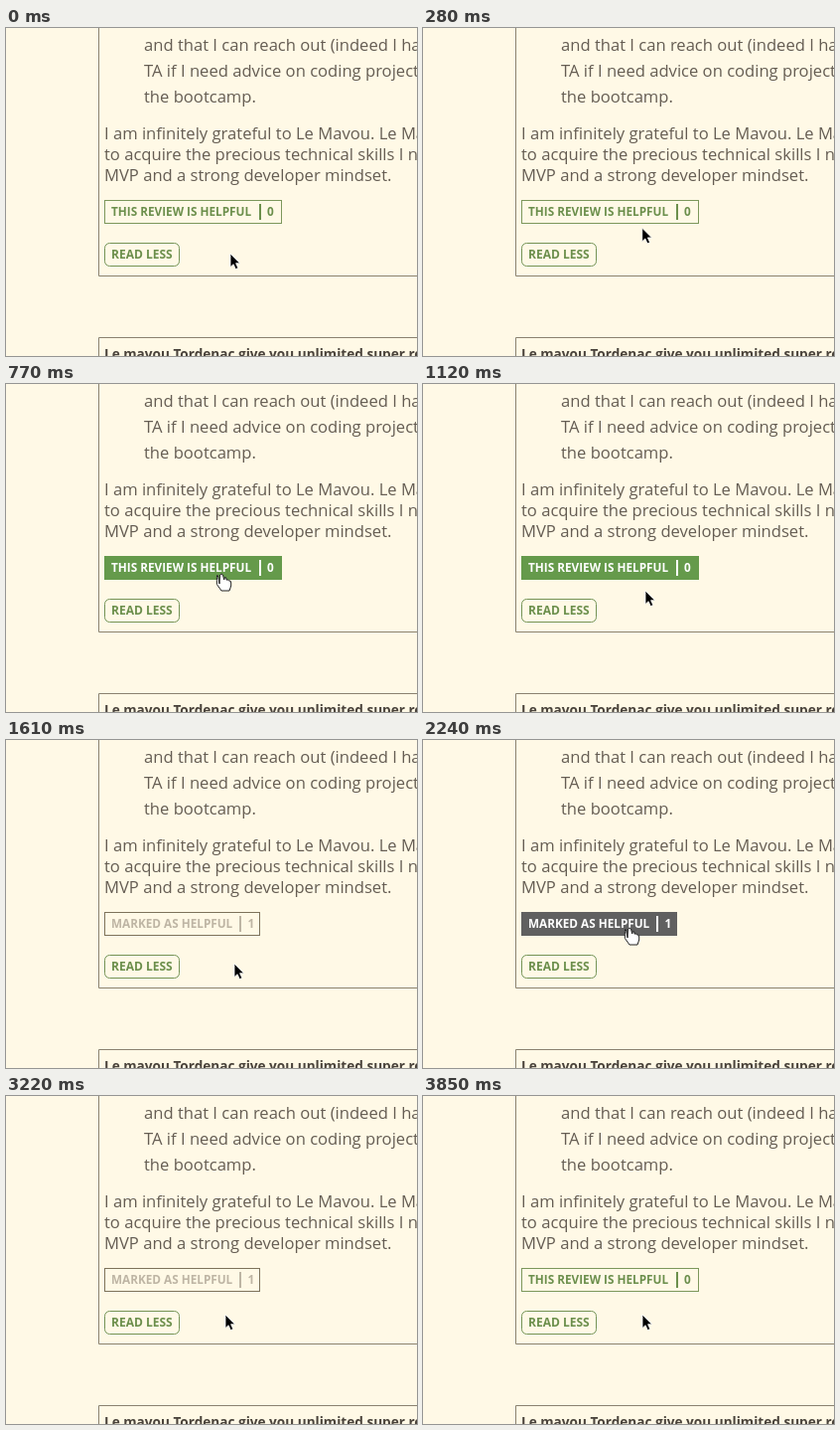
An HTML page for the animation above (3920 ms loop, 414 px wide and 330 px high).

```html
<!DOCTYPE html>
<html lang="en">
<head>
<meta charset="utf-8">
<title>Helpful review button</title>
<style>
  html, body { margin: 0; width: 100%; height: 100%; overflow: hidden; background: #fff9e6; }
  svg { display: block; width: 414px; height: 330px; }
  text { font-family: "Open Sans", sans-serif; white-space: pre; }
  .copy { font-size: 16.6px; fill: #655d53; }
  .title { font-size: 13.6px; font-weight: 700; fill: #4a433b; }
  .label { font-size: 11.75px; font-weight: 700; }
  .line { fill: none; stroke: #8b8270; }
</style>
</head>
<body>
<svg viewBox="0 0 414 330">
  <rect width="414" height="330" fill="#fff9e6"/>
  <path class="line" d="M93.5 0V249.5H414M93.5 330V311.5H414"/>
  <g class="copy">
    <text x="139" y="23">and that I can reach out (indeed I have)</text>
    <text x="139" y="49">TA if I need advice on coding projects</text>
    <text x="139" y="75">the bootcamp.</text>
    <text x="99" y="112">I am infinitely grateful to Le Mavou. Le Mavou</text>
    <text x="99" y="133">to acquire the precious technical skills I need</text>
    <text x="99" y="154">MVP and a strong developer mindset.</text>
  </g>
  <text class="title" x="99" y="332.5">Le mavou Tordenac give you unlimited super review</text>

  <rect id="box" x="99.5" y="173.5" height="23"/>
  <g id="ink" class="label">
    <text id="caption" x="106" y="189"></text>
    <rect id="bar" y="177" width="2" height="16"/>
    <text id="count" y="189"></text>
  </g>

  <rect x="99.5" y="216.5" width="75" height="23" rx="5" fill="none" stroke="#749356"/>
  <text class="label" x="106" y="232" style="font-size:12px" fill="#6c8f4c">READ LESS</text>

  <path id="arrow" d="M0 0V13.5L3.1 10.7L5.3 15.6L7.8 14.5L5.6 9.7H9.7Z"
        fill="#000" stroke="#fff" stroke-width=".8"/>
  <path id="hand" d="M-1.5 1Q0-1 1.5 1L2.7 6Q4-.0 5.2 6.2Q6.8 5 7.5 7Q9.6 6.2 9.7 9V12L8 17H0L-4.6 10.5Q-5-8 -2 10Z"
        fill="#fff" stroke="#222" stroke-linejoin="round"/>
</svg>
<script>
const LOOP = 3920, STEP = 70;
const CREAM = [255, 249, 230], WHITE = [255, 255, 255];
const $ = id => document.getElementById(id);

const unmarked = { caption: "THIS REVIEW IS HELPFUL", count: "0", width: 178, bar: 255, num: 263,
                   fill: [101, 154, 75], ink: [108, 143, 76], edge: [125, 151, 92] };
const marked = { caption: "MARKED AS HELPFUL", count: "1", width: 156, bar: 235, num: 243.5,
                 fill: [96, 96, 96], ink: [190, 181, 164], edge: [126, 115, 91] };

// time, x, y of the pointer tip
const route = [
  [0, 226, 227], [70, 226, 226], [350, 219, 193], [490, 217, 191], [560, 216, 190],
  [630, 216, 190], [770, 217, 191], [980, 217, 191], [1120, 224, 208], [1330, 231, 225],
  [1610, 230, 225], [1750, 228, 222], [2030, 212, 193], [2240, 208, 189], [2520, 208, 189],
  [2660, 209, 190], [2800, 209, 190], [2940, 214, 205], [3220, 221, 220], [3920, 221, 220]
];

const ramp = (t, a, b) => Math.min(1, Math.max(0, (t - a) / (b - a)));
const mix = (a, b, k) => a.map((v, i) => v + (b[i] - v) * k);
const rgb = c => `rgb(${c.map(Math.round)})`;

function pointer(t) {
  const i = route.findIndex(p => p[0] > t);
  const [a, b] = [route[i - 1], route[i]];
  return mix(a, b, ramp(t, a[0], b[0])).slice(1);
}

function draw(t) {
  const state = t >= 1540 && t < 3360 ? marked : unmarked;
  const fill = ramp(t, 280, 420) - ramp(t, 1120, 1400)
             + ramp(t, 2030, 2170) - ramp(t, 2800, 3010);
  const fresh = t >= 3360 ? 0.4 + 0.6 * ramp(t, 3500, 3850) : 1;
  const ink = mix(mix(CREAM, state.ink, fresh), WHITE, fill);

  $("box").setAttribute("width", state.width);
  $("box").setAttribute("fill", rgb(mix(CREAM, state.fill, fill)));
  $("box").setAttribute("stroke", rgb(mix(state.edge, state.fill, fill)));
  $("ink").setAttribute("fill", rgb(ink));
  $("caption").textContent = state.caption;
  $("bar").setAttribute("x", state.bar);
  $("count").setAttribute("x", state.num);
  $("count").textContent = state.count;

  const [x, y] = pointer(t);
  const over = y < 197;
  $("arrow").style.display = over ? "none" : "";
  $("hand").style.display = over ? "" : "none";
  $(over ? "hand" : "arrow").setAttribute("transform", `translate(${x} ${y})`);
}

const start = performance.now();
function tick() {
  const t = (performance.now() - start) % LOOP;
  draw(Math.floor(t / STEP) * STEP);
  requestAnimationFrame(tick);
}
tick();
</script>
</body>
</html>
```
